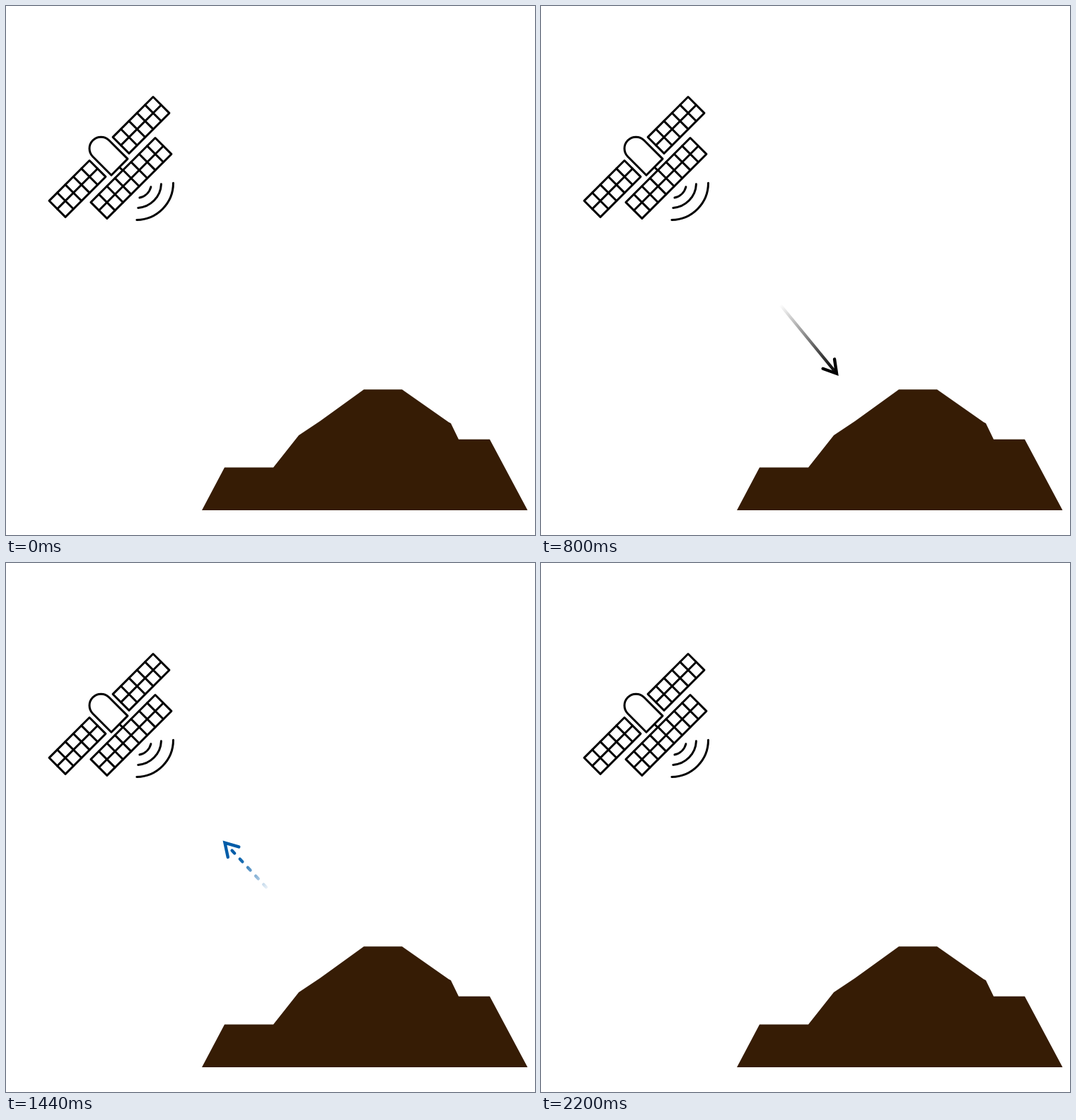
Write an HTML page with a canvas that moves like this. It is 748 by 748 pixels and loops after 2.24 s.

```html
<!DOCTYPE html>
<html>
<head>
<meta charset="utf-8">
<style>
html, body { margin: 0; width: 100%; height: 100%; overflow: hidden; background: #fff; }
canvas { display: block; width: 748px; height: 748px; }
</style>
</head>
<body>
<canvas id="stage" width="748" height="748"></canvas>
<script>
const ctx = document.getElementById('stage').getContext('2d');
const LOOP = 2240;
const STEP = 40;
const HILL = [[277, 713], [309, 652.5], [378, 652.5], [414, 607], [444, 587],
  [506, 542.3], [560, 542.3], [626, 588.5], [629, 590], [640, 612.8],
  [684, 612.8], [737.5, 713]];

const clamp = v => Math.max(0, Math.min(1, v));

function line(x1, y1, x2, y2) {
  ctx.beginPath();
  ctx.moveTo(x1, y1);
  ctx.lineTo(x2, y2);
  ctx.stroke();
}

// Tilted grid of square cells, running down-left from its top corner.
function panel(x, y, cols) {
  const len = cols * 16.1, wide = 32.4;
  ctx.save();
  ctx.translate(x, y);
  ctx.rotate(Math.PI * 3 / 4);
  ctx.strokeRect(0, -wide, len, wide);
  line(0, -wide / 2, len, -wide / 2);
  for (let i = 1; i < cols; i++) line(i * 16.1, -wide, i * 16.1, 0);
  ctx.restore();
}

function satellite() {
  ctx.strokeStyle = '#000';
  ctx.lineWidth = 3;
  ctx.lineJoin = 'round';
  ctx.lineCap = 'round';
  panel(208, 128.5, 5);
  panel(118, 218.5, 5);
  panel(211, 186.5, 8);
  line(160.5, 228, 165, 232.5);

  ctx.save();
  ctx.translate(134.3, 201.5);
  ctx.rotate(Math.PI / 4);
  ctx.beginPath();
  ctx.arc(0, 0, 16.3, Math.PI / 2, Math.PI * 1.5);
  ctx.lineTo(37, -16.3);
  ctx.lineTo(37, 16.3);
  ctx.closePath();
  ctx.stroke();
  ctx.restore();

  for (const [r, a, b] of [[21.3, .26, 1.35], [35.2, .04, 1.5], [52.2, 0, 1.56]]) {
    ctx.beginPath();
    ctx.arc(184.3, 250.3, r, a, b);
    ctx.stroke();
  }
}

function hill() {
  ctx.fillStyle = '#361c05';
  ctx.beginPath();
  for (const [x, y] of HILL) ctx.lineTo(x, y);
  ctx.fill();
}

function arrow(x, y, angle, size, len, rgb, solid, dash) {
  if (size <= 0) return;
  ctx.save();
  ctx.translate(x, y);
  ctx.rotate(angle);
  ctx.scale(size, size);
  ctx.translate(len / 2, 0);

  const fade = ctx.createLinearGradient(-len, 0, 0, 0);
  fade.addColorStop(0, `rgba(${rgb},0)`);
  fade.addColorStop(solid, `rgba(${rgb},.9)`);
  fade.addColorStop(Math.min(1, solid + .15), `rgba(${rgb},1)`);
  ctx.strokeStyle = fade;
  ctx.lineWidth = 4.2;
  ctx.lineCap = dash ? 'round' : 'butt';
  ctx.setLineDash(dash || []);
  if (dash) line(-19, 0, -len, 0);
  else line(-len, 0, -5, 0);

  ctx.setLineDash([]);
  ctx.strokeStyle = `rgb(${rgb})`;
  ctx.lineWidth = 4.4;
  ctx.lineCap = 'round';
  ctx.lineJoin = 'miter';
  ctx.beginPath();
  ctx.moveTo(-22, -10.6);
  ctx.lineTo(-4.3, 0);
  ctx.lineTo(-22, 10.6);
  ctx.stroke();
  ctx.restore();
}

function outgoing(t) {
  const size = Math.min(clamp(t / 500), clamp((1120 - t) / 140));
  const d = t - 600;
  arrow(329 + d * .2527, 415 + d * .289, Math.atan2(50, 41), size, 130, '0,0,0', .85);
}

function returning(t) {
  const size = Math.min(clamp((t - 1120) / 120), clamp((1900 - t) / 200));
  const d = t - 1240;
  arrow(410 - d * .352, 508.5 - d * .402, Math.atan2(-73, -68), size, 97, '0,92,168', .58, [5.5, 10.9]);
}

function draw(now) {
  const t = Math.floor(now % LOOP / STEP) * STEP;
  ctx.fillStyle = '#fff';
  ctx.fillRect(0, 0, 748, 748);
  outgoing(t);
  returning(t);
  hill();
  satellite();
}

const start = performance.now();
function tick() {
  draw(performance.now() - start);
  requestAnimationFrame(tick);
}
tick();
</script>
</body>
</html>
```
